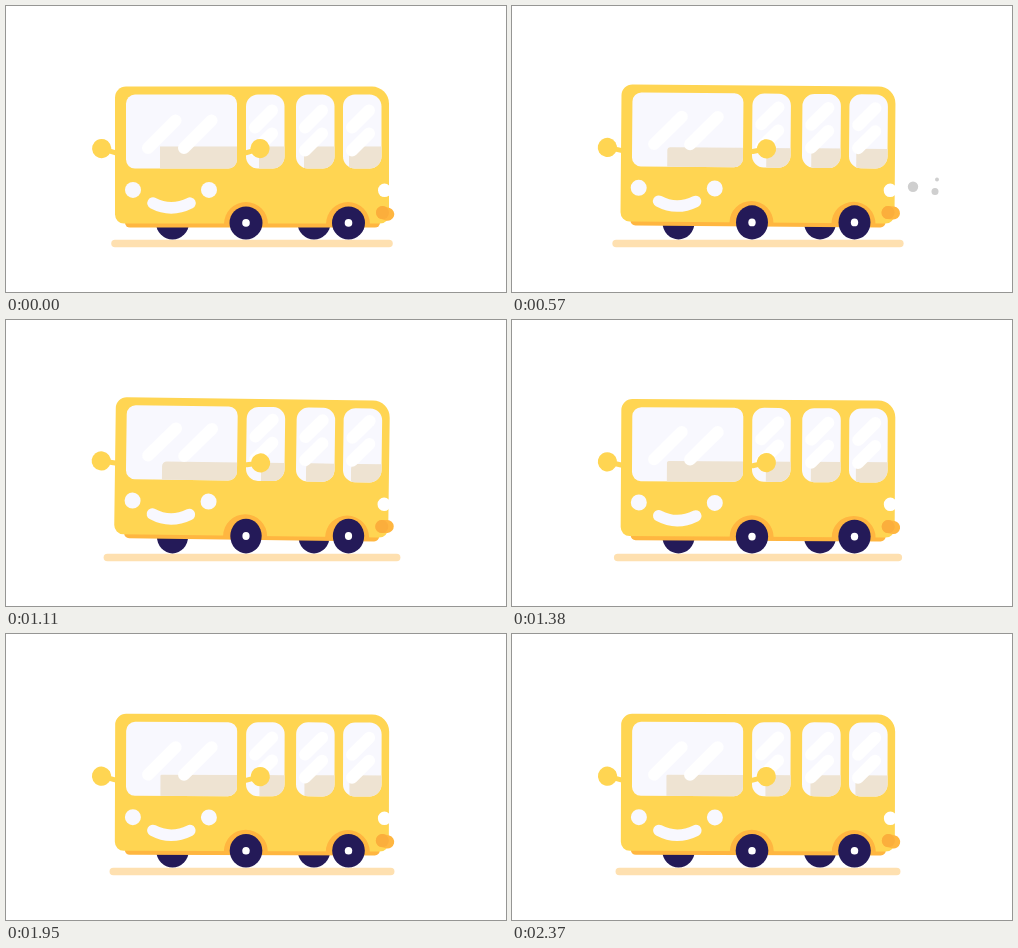
An HTML page with a canvas that plays this animation: 500 by 286 pixels, repeating every 2400 ms.

```html
<!DOCTYPE html>
<html>
<head>
<meta charset="utf-8">
<style>
html, body { margin: 0; height: 100%; overflow: hidden; background: #fff; }
canvas { display: block; }
</style>
</head>
<body>
<canvas id="stage" width="500" height="286"></canvas>
<script>
const ctx = document.getElementById('stage').getContext('2d');
const LOOP = 2400, STEP = 30, BOUNCE = 480;
const YELLOW = '#ffd552', ORANGE = '#ffb640', NAVY = '#241a58', GLASS = '#f8f8fe';

function ellipse(x, y, rx, ry, color) {
  ctx.fillStyle = color;
  ctx.beginPath();
  ctx.ellipse(x, y, rx, ry, 0, 0, 2 * Math.PI);
  ctx.fill();
}

const circle = (x, y, r, color) => ellipse(x, y, r, r, color);

function box(x, y, w, h, radii, color) {
  ctx.fillStyle = color;
  ctx.beginPath();
  ctx.roundRect(x, y, w, h, radii);
  ctx.fill();
}

function line(x1, y1, x2, y2, width, color) {
  ctx.strokeStyle = color;
  ctx.lineWidth = width;
  ctx.lineCap = 'round';
  ctx.beginPath();
  ctx.moveTo(x1, y1);
  ctx.lineTo(x2, y2);
  ctx.stroke();
}

function rotated(x, y, degrees, draw) {
  ctx.save();
  ctx.translate(x, y);
  ctx.rotate(degrees * Math.PI / 180);
  draw();
  ctx.restore();
}

function wheel(x, lift, hub) {
  const rx = 16.5 - 1.2 * lift, ry = 16.5 + 1.2 * lift;
  ellipse(x, 233.4 - ry, rx, ry, NAVY);
  if (hub) ellipse(x, 233.4 - ry, rx * 0.23, ry * 0.23, '#fff');
}

// Three puffs leave the exhaust in turn, drift right and shrink away.
function smoke(t) {
  for (let i = 0; i < 3; i++) {
    const small = i % 2, age = t - 60 - 165 * i;
    const p = Math.min(1, age / 360);
    const r = (small ? 3.5 : 5.2) * Math.min(1, 1 - (age - 360) / 240);
    if (age <= 0 || r <= 0) continue;
    const y1 = 202 - 7 * i, y2 = small ? 185 : 173.5;
    const tint = 25 * Math.max(0, 1 - 2 * p);
    circle(377 + 48 * p, y1 + (y2 - y1) * p, r, `hsl(245, ${tint}%, 81%)`);
  }
}

// Inside the glass the seat sinks while the glare rises.
function pane(x, w, radius, seat, lift, drawGlare) {
  ctx.save();
  box(x, 89, w, 74, radius, GLASS);
  ctx.clip();
  box(seat + 3 * lift, 141 + 5.5 * lift, 90, 40, 7 * lift, '#eee3d2');
  ctx.translate(0, -5 * lift);
  drawGlare();
  ctx.restore();
}

const glare = (x, y, size) => line(x, y, x + size, y - size, 12, '#fff');

function mirror(x, side, lift) {
  rotated(x, 147, side * (13 * lift - 17), () => {
    line(0, 0, side * 13, 0, 5, YELLOW);
    circle(side * 14, 0, 9.6, YELLOW);
  });
}

function bus(lift) {
  box(119, 208, 255, 14, 5, ORANGE);
  box(109, 81, 274, 137, [11, 17, 9, 9], YELLOW);
  for (const x of [240, 342]) {
    ctx.save();
    ctx.beginPath();
    ctx.rect(x - 30, 180, 60, 41);
    ctx.clip();
    circle(x, 218.5, 22, ORANGE);
    ctx.restore();
  }

  pane(120, 111, 9, 154, lift, () => {
    glare(142, 142.5, 27.5);
    glare(178, 142.5, 27.5);
  });
  [240, 290, 337].forEach((x, i) => pane(x, 38.5, 12, 253 + 45 * i, lift, () => {
    glare(x + 9, 122, 17);
    glare(x + 9, 145, 17);
  }));
  mirror(109, -1, lift);
  mirror(240.7, 1, lift);

  circle(127, 184.3, 8, GLASS);
  circle(203, 184.3, 8, GLASS);
  ctx.strokeStyle = GLASS;
  ctx.lineWidth = 11.5;
  ctx.beginPath();
  ctx.moveTo(147, 197.5);
  ctx.quadraticCurveTo(165, 207, 184, 197.5);
  ctx.stroke();

  box(372, 178, 13, 13.5, 6.5, '#fff');
  rotated(376.5, 207, 18 - 30 * lift, () => line(0, 0, 5.5, 0, 13, ORANGE));
  circle(376.5, 207, 6.5, '#fbae3c');
}

function frame(now) {
  const t = Math.floor(now % LOOP / STEP) * STEP;
  const rise = 1 - Math.abs(t % BOUNCE / (BOUNCE / 2) - 1);
  const lift = rise * (1.25 - 0.25 * rise);
  ctx.clearRect(0, 0, 500, 286);
  line(109 - 11.2 * lift, 237.5, 383 + 11.2 * lift, 237.5, 7.5, '#fee0b0');
  smoke(t);
  wheel(166.5, lift);
  wheel(308, lift);
  rotated(380, 150, 1.1 * lift, () => {
    ctx.translate(-380, -150.4);
    bus(lift);
  });
  wheel(240, lift, true);
  wheel(342.5, lift, true);
}

function tick(now) {
  frame(now);
  requestAnimationFrame(tick);
}
requestAnimationFrame(tick);
</script>
</body>
</html>
```
